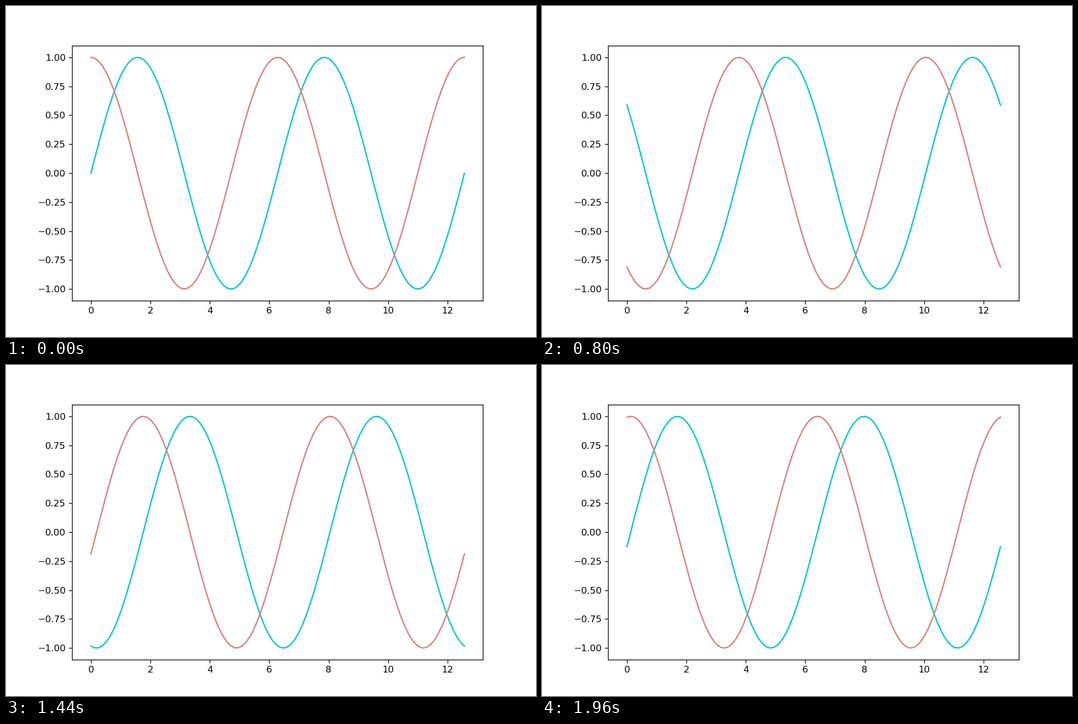
Animation, 947 px wide and 592 px high, one loop 2 s. Source, as a matplotlib script:

```python
import numpy as np
import matplotlib.pyplot as plt
from matplotlib.animation import FuncAnimation

FRAMES = 50
INTERVAL = 40  # ms

plt.rcParams["font.family"] = "DejaVu Sans"

fig, ax = plt.subplots(figsize=(8, 5), dpi=118.4)
x = np.linspace(0, 4 * np.pi, 100)
sin_line, = ax.plot(x, np.sin(x), color="#00cccc", lw=1.5)
cos_line, = ax.plot(x, np.cos(x), color="#dd8080", lw=1.5)


def update(i):
    phase = 2 * np.pi * i / FRAMES
    sin_line.set_ydata(np.sin(x + phase))
    cos_line.set_ydata(np.cos(x + phase))
    return sin_line, cos_line


anim = FuncAnimation(fig, update, frames=FRAMES, interval=INTERVAL,
                     repeat=True, repeat_delay=0)
plt.show()
```
